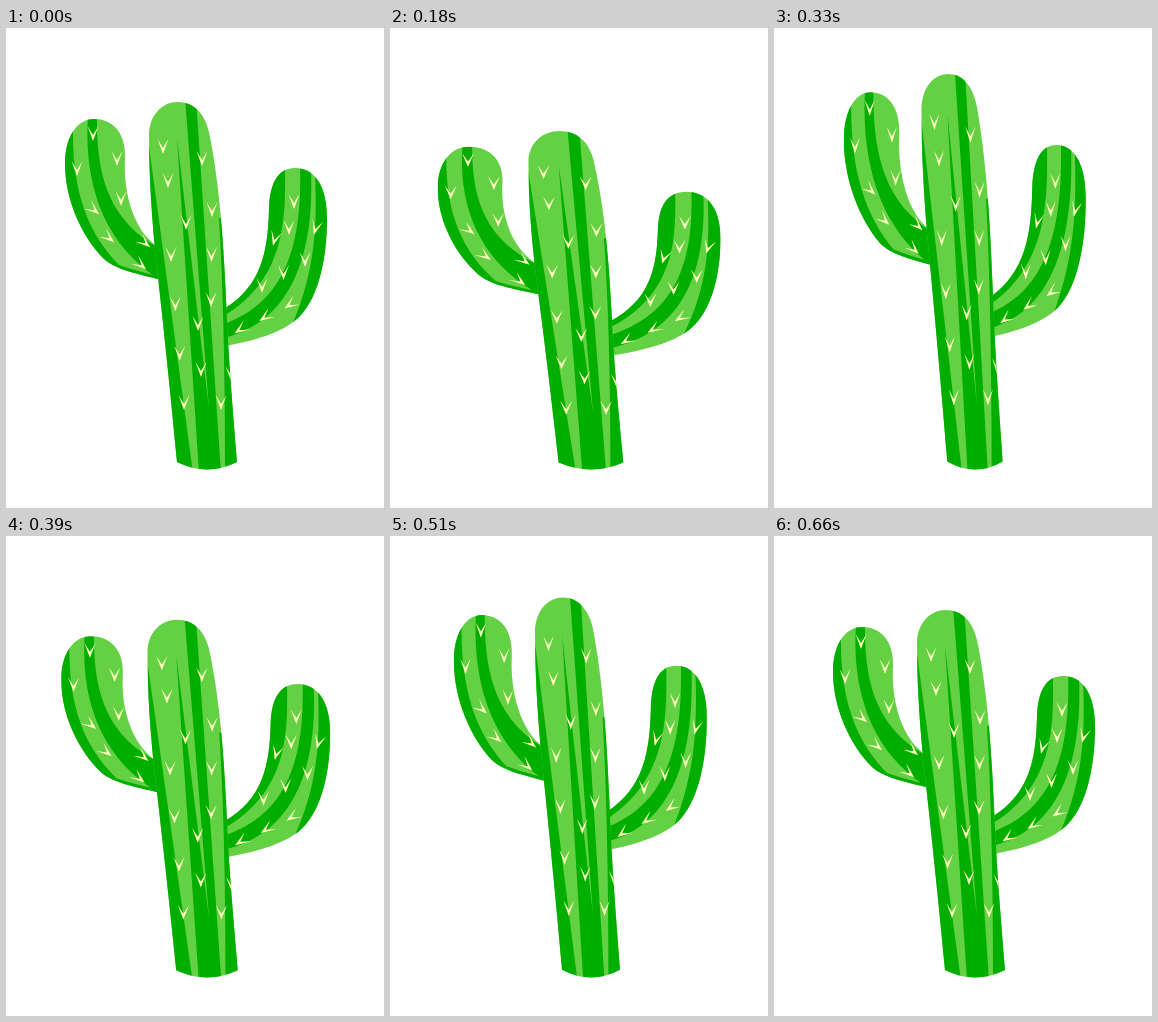
These frames come from a looping animation (378 px wide and 480 px high, 0.9 s). An HTML page:

```html
<!DOCTYPE html>
<html lang="en">
<head>
<meta charset="utf-8">
<title>Bouncing cactus</title>
<style>
  html, body { margin: 0; height: 100%; overflow: hidden; background: #fff; }
  svg { display: block; width: 100%; height: 100%; }
  .light { fill: #64d145; }
  .dark { fill: #00ae00; }
  .spine { fill: #ffffbe; }
</style>
</head>
<body>
<svg viewBox="0 0 378 480"><g id="cactus"></g></svg>
<script>
  // Each limb: outline, then dark stripes clipped to it
  const limbs = {
    left: [
      'M88 91C106 91 120 104 119 130C117 166 128 203 152 219L160 253C132 246 110 242 98 231C76 209 59 172 59 136C59 110 70 91 88 91Z',
      'M67 100C66 158 79 204 115 239H90L50 170V100Z' +
      'M82 88H91C90 150 104 194 155 221L162 256C112 230 76 175 82 88Z' +
      'M98 231Q125 243 162 250V260H98Z'
    ],
    right: [
      'M289 140C272 140 264 155 263 180C262 225 255 258 218 281L220 318C252 312 280 303 294 288C313 268 321 230 321 190C321 160 310 140 289 140Z',
      'M279 136C279 182 284 248 218 288V275L258 180V140Z' +
      'M294 136L305 142C308 215 292 292 218 310V296C275 275 297 225 294 136Z' +
      'M309 145C311 195 310 242 286 297L325 260V145Z'
    ],
    trunk: [
      'M171 434C163 350 156 285 151 240C146 195 143 150 143 108C143 87 156 74 172 74C188 74 199 86 203 104C212 148 217 200 220 270C222 325 227 385 231 434Q201 449 171 434Z',
      'M143 118L187 445H160L140 240Z' +
      'M171 110L203 381L179 70H190L215 445H193Z' +
      'M213 190Q219 290 219 445H235V190Z'
    ]
  };

  // Evenly spaced rows of spines: first x, y, last x, y, count, tilt in degrees
  const rows = [
    [157, 118, 162, 152, 2], [165, 226, 178, 374, 4], [196, 130, 180, 194, 2],
    [206, 181, 205, 271, 3], [192, 295, 195, 341, 2], [225, 345, 215, 374, 2],
    [87, 105, 71, 140, 2], [111, 130, 115, 170, 2],
    [87, 181, 102, 209, 2, -50], [138, 214, 134, 236, 2, -50],
    [288, 173, 283, 199, 2], [299, 231, 256, 257, 3],
    [269, 210, 310, 199, 2, 15], [285, 276, 235, 301, 3, 55]
  ];

  const mix = (a, b, p) => a + (b - a) * p;
  const ease = p => p * p * (3 - 2 * p);

  const limbMarkup = ([name, [outline, stripes]]) => `
    <clipPath id="${name}"><path d="${outline}"/></clipPath>
    <path class="light" d="${outline}"/>
    <path class="dark" d="${stripes}" clip-path="url(#${name})"/>`;

  const rowMarkup = ([x0, y0, x1, y1, count, tilt = 0]) =>
    Array.from({ length: count }, (_, i) => {
      const p = i / (count - 1);
      return `<path class="spine" d="M-5.5-7L0 8L5.5-7L0 2Z"
        transform="translate(${mix(x0, x1, p)} ${mix(y0, y1, p)}) rotate(${tilt})"/>`;
    }).join('');

  const cactus = document.getElementById('cactus');
  const outlines = Object.values(limbs).map(([outline]) => outline).join('');
  cactus.innerHTML = Object.entries(limbs).map(limbMarkup).join('') +
    `<clipPath id="whole"><path d="${outlines}"/></clipPath>
     <g clip-path="url(#whole)">${rows.map(rowMarkup).join('')}</g>`;

  // Stretch keys: time in ms, amount added to the height and taken from the width
  const keys = [[0, 0], [150, -.1], [300, .1], [420, -.05], [540, .05], [660, 0], [900, 0]];
  const LOOP = 900, STEP = 30, BASE_X = 201, BASE_Y = 441;

  function stretchAt(time) {
    const i = keys.findIndex(([end]) => time < end);
    const [t0, v0] = keys[i - 1], [t1, v1] = keys[i];
    return mix(v0, v1, ease((time - t0) / (t1 - t0)));
  }

  const start = performance.now();

  function draw() {
    const elapsed = (performance.now() - start) % LOOP;
    const s = stretchAt(Math.floor(elapsed / STEP) * STEP);
    cactus.setAttribute('transform',
      `translate(${BASE_X} ${BASE_Y}) scale(${1 - s} ${1 + s}) translate(${-BASE_X} ${-BASE_Y})`);
    requestAnimationFrame(draw);
  }
  draw();
</script>
</body>
</html>
```
